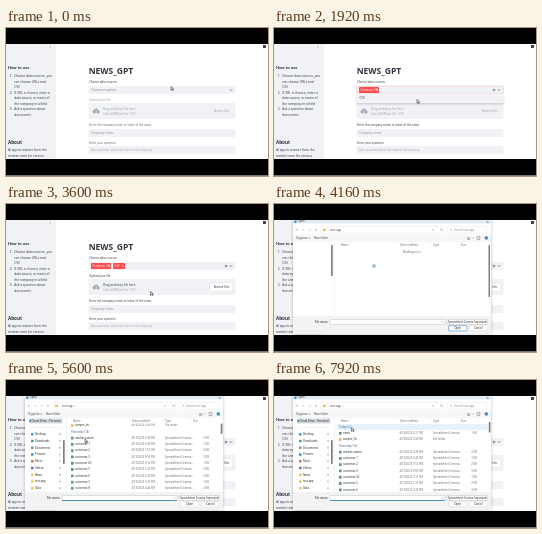
These frames come from a looping animation (262x148 px, 8 s). An HTML page with a canvas:

```html
<!DOCTYPE html>
<html lang="en">
<head>
<meta charset="utf-8">
<title>News assistant demo</title>
<style>
html, body { margin: 0; width: 100%; height: 100%; overflow: hidden; background: #000; }
canvas { display: block; width: 262px; height: 148px; }
</style>
</head>
<body>
<canvas id="stage" width="262" height="148"></canvas>
<script>
const ctx = document.getElementById('stage').getContext('2d');
const LOOP = 8000, STEP = 80;
const INK = '#31333f', PALE = '#f0f2f6', RED = '#ff4b4b', MUTED = '#9a9ca5';
const DARK = '#222', SOFT = '#666';

function rect(x, y, w, h, fill, stroke, radius = 0, line = .5) {
  ctx.beginPath();
  ctx.roundRect(x, y, w, h, radius);
  if (fill) { ctx.fillStyle = fill; ctx.fill(); }
  if (stroke) { ctx.strokeStyle = stroke; ctx.lineWidth = line; ctx.stroke(); }
}

function text(str, x, y, size = 3.2, color = INK, weight = 400, align = 'left') {
  ctx.font = `${weight} ${size}px "Open Sans", "Noto Sans", sans-serif`;
  ctx.textAlign = align;
  ctx.textBaseline = 'middle';
  ctx.fillStyle = color;
  ctx.fillText(str, x, y);
}

function path(points, color, width = .6) {
  ctx.beginPath();
  points.forEach(([x, y]) => ctx.lineTo(x, y));
  ctx.strokeStyle = color;
  ctx.lineWidth = width;
  ctx.stroke();
}

function chevron(x, y, color = INK, s = 1.1) {
  path([[x - s, y - s / 2], [x, y + s / 2], [x + s, y - s / 2]], color);
}

function cross(x, y, s, color) {
  path([[x - s, y - s], [x + s, y + s]], color, .5);
  path([[x + s, y - s], [x - s, y + s]], color, .5);
}

function disc(x, y, r, color) {
  ctx.beginPath();
  ctx.arc(x, y, r, 0, 7);
  ctx.fillStyle = color;
  ctx.fill();
}

function clipped(x, y, w, h, draw) {
  ctx.save();
  ctx.beginPath();
  ctx.rect(x, y, w, h);
  ctx.clip();
  draw();
  ctx.restore();
}

// Piecewise eased values: each key is [time, ...values].
function along(keys, t) {
  let i = 0;
  while (i < keys.length - 2 && t >= keys[i + 1][0]) i++;
  const a = keys[i], b = keys[i + 1];
  const p = Math.min(1, Math.max(0, (t - a[0]) / (b[0] - a[0])));
  const e = p * p * (3 - 2 * p);
  return a.slice(1).map((v, k) => v + (b[k + 1] - v) * e);
}

const pointerKeys = [
  [0, 165, 58.5], [720, 165, 58.5], [960, 152, 63], [1200, 139, 74],
  [1680, 139, 74], [1840, 143, 71.5], [2720, 143, 71.5], [3120, 144.5, 87.5],
  [3600, 144.5, 87.5], [3760, 214, 84], [3840, 214, 84], [4160, 99.5, 61],
  [4480, 99.5, 61], [5280, 79, 59], [6720, 79, 59], [7440, 77.5, 47.5], [8000, 77.5, 47.5]
];
const scrollKeys = [[0, 0], [5440, 0], [5600, 14], [5840, 38], [6080, 38], [6400, 0], [8000, 0]];

const steps = [
  ['1.', 'Choose data sources, you'], ['', 'can choose URLs and'], ['', 'CSV'],
  ['2.', 'If URL is chosen, enter a'], ['', 'data source, or name of'], ['', 'the company in a field'],
  ['3.', 'Ask a question about'], ['', 'documents']
];

function sidebar() {
  rect(0, 16, 50, 115, PALE);
  cross(44, 19, .7, '#a4a7b0');
  text('How to use', 2, 40, 3.9, INK, 700);
  steps.forEach(([mark, line], i) => {
    text(mark, 3.7, 48.3 + i * 5.55, 3.2);
    text(line, 8.2, 48.3 + i * 5.55, 3.2);
  });
  text('About', 2, 114.3, 4.6, INK, 700);
  text('AI app to answer from the', 2, 122.4, 3.2);
  text('market news for various', 2, 128, 3.2);
}

function tag(x, w, label) {
  rect(x, 59, w, 6, RED, null, .8);
  text(label, x + 1.5, 62, 2.8, '#fff');
  cross(x + w - 2, 62, .55, '#fff');
}

function uploader(ready) {
  const ink = ready ? INK : MUTED;
  text('Upload your file', 83, 72, 2.9, ink);
  rect(82.5, 75, 147, 16, PALE, null, 1);
  disc(88.3, 83.7, 1.8, '#a5abb6');
  disc(90.2, 82.6, 2.2, '#a5abb6');
  disc(92, 84, 1.7, '#a5abb6');
  path([[90.2, 85.2], [90.2, 82.3]], '#fff');
  text('Drag and drop file here', 97, 81.1, 3, ink);
  text('Limit 200MB per file • CSV', 97, 85.8, 2.7, MUTED);
  rect(204, 79, 23, 8.5, ready ? '#fff' : null, ready ? '#dcdee3' : null, 1);
  text('Browse files', 215.5, 83.2, 2.8, ink, 400, 'center');
}

function page(t) {
  rect(0, 16, 262, 115, '#fff');
  sidebar();
  rect(257, 17, 3, 3, '#444');
  text('NEWS_GPT', 82.7, 43.5, 8.5, INK, 700);
  text('Choose data sources', 83, 54, 2.9);

  const chosen = t < 1760 ? 0 : t < 2800 ? 1 : 2;
  const open = t >= 880 && t < 3040;
  rect(82.5, 58, 147, 8, PALE, open ? '#ff9c9c' : null, 1, .4);
  if (!chosen) text('Choose an option', 85, 62, 3, '#7b7e88');
  if (chosen > 0) tag(85, 20, 'Company URL');
  if (chosen > 1) tag(107, 12, 'CSV');
  if (chosen) {
    disc(220, 62, 1.3, '#777b85');
    cross(220, 62, .5, '#fff');
  }
  chevron(225, 62);

  uploader(chosen === 2);
  const lower = chosen ? INK : '#60636e';
  text('Enter the company name or ticker of the news', 83, 97.3, 2.9, lower);
  rect(82.5, 101, 147, 8, PALE, null, 1);
  text('Company name', 85, 105, 3, '#898c96');
  text('Enter your question', 83, 114.8, 2.9, lower);
  rect(82.5, 118, 147, 8, PALE, null, 1);
  text('Ask a question about the news of the company', 85, 122, 2.8, '#a0a3ac');

  if (open) {
    const options = chosen === 0 ? ['Company URL', 'CSV'] : chosen === 1 ? ['CSV'] : [];
    const height = 1 + 8 * Math.max(1, options.length);
    ctx.save();
    ctx.shadowColor = '#0004';
    ctx.shadowBlur = 2;
    ctx.shadowOffsetY = .8;
    rect(82.5, 66.2, 147, height, '#fff', null, 1);
    ctx.restore();
    if (chosen < 2) rect(83, 67, 146, 7.5, PALE);
    options.forEach((name, i) => text(name, 85.5, 70.4 + i * 8, 3));
  }
  if ((t >= 1760 && t < 1920) || (t >= 2800 && t < 3120)) {
    text('RUNNING…', 251, 19, 2.4, MUTED, 400, 'right');
  }
}

const places = ['Desktop', 'Downloads', 'Documents', 'Pictures', 'Music', 'Videos', 'News', 'test-app', 'Data'];
const placeColors = ['#2f9fd0', '#4a9b83', '#7691aa', '#3d87c8', '#e0654f', '#8a5bc0', '#f2c14e', '#f2c14e', '#f2c14e'];

function placesPane(t) {
  if (t >= 4560) {
    rect(23, 38.5, 33.5, 5, '#d5d9dd');
    text('Cloud Drive - Personal', 25.5, 41, 2.8, DARK);
    disc(24.2, 41, 1, '#2784cf');
    path([[24, 47.5], [56, 47.5]], '#e2e2e2', .4);
    places.forEach((name, i) => {
      const y = 54.3 + i * 6.75;
      rect(25, y - 1.2, 2.5, 2.4, placeColors[i], null, .4);
      text(name, 29, y, 2.8, DARK);
      rect(53.5, y - .7, 1, 1.4, '#888');
    });
    rect(57, 60, 1.7, 24, '#808080', null, .6);
  } else {
    rect(57, 41, 1.7, 31, '#808080', null, .6);
  }
  path([[60.3, 39], [60.3, 112]], '#e5e5e5', .5);
}

const listing = [
  { group: 'Today (2)' }, { name: 'news', size: '1 KB' }, { name: 'sample_fin', folder: true },
  { group: 'Yesterday (14)' }, { name: 'market-names', size: '2 KB' },
  ...Array.from({ length: 13 }, (_, i) => ({
    name: i === 3 ? 'customer (2)' : 'customer-' + (i + 1),
    size: 1 + i % 3 + ' KB'
  }))
];

function files(t) {
  const [scroll] = along(scrollKeys, t);
  const hover = t < 6240 ? -1 : t < 7200 ? 2 : 0;
  clipped(62, 43.5, 152.5, 68.5, () => {
    listing.forEach((file, i) => {
      const y = 47 + i * 6.28 - scroll;
      if (i === hover) rect(63, y - 2.9, file.group ? 151 : 140, 5.8, '#e5f2fb');
      if (file.group) {
        text(file.group, 65, y, 2.8, '#355f93');
        return;
      }
      rect(65, y - 1.4, 2.6, 2.8, file.folder ? '#f1b94b' : '#5f9a78', null, .4);
      text(file.name, 69, y, 2.8, DARK);
      text(`4/${i < 3 ? 14 : 13}/2023 ${1 + i % 9}:${10 + i * 7 % 50} PM`, 125.5, y, 2.7, SOFT);
      text(file.folder ? 'File folder' : 'Spreadsheet Comma…', 159, y, 2.7, SOFT);
      if (file.size) text(file.size, 203, y, 2.7, SOFT, 400, 'right');
    });
  });
  rect(214.8, 42 + scroll * .1, 1.6, 10.5, '#777', null, .6);
}

function dialogButton(x, w, label, active) {
  rect(x, 121.7, w, 5.2, '#fdfdfd', active ? '#2277bd' : '#d4d4d4', .7);
  text(label, x + w / 2, 124.2, 2.8, DARK, 400, 'center');
}

function dialog(t) {
  const loaded = t >= 4640;
  const grow = Math.min(1, Math.max(0, (t - 3840) / 160));
  ctx.save();
  ctx.globalAlpha = grow;
  const scale = .92 + .08 * grow;
  ctx.translate(118, 73);
  ctx.scale(scale, scale);
  ctx.translate(-118, -73);
  ctx.shadowColor = '#0004';
  ctx.shadowBlur = 3;
  rect(19, 16, 198, 114, '#fff');
  ctx.shadowColor = 'transparent';
  rect(19, 16, 198, 3.6, '#e1edf6');
  rect(20.2, 16.6, 2.2, 2.2, '#2882be');
  text('Open', 23.5, 17.7, 2.8, DARK);
  cross(213.5, 18, .9, '#555');

  path([[24, 26], [21.8, 26], [22.8, 25]], '#888', .5);
  path([[28, 26], [30.2, 26], [29.2, 25]], '#bbb', .5);
  chevron(36, 26, '#888', .8);
  path([[42, 27], [42, 24.8], [41, 25.8]], '#888', .5);
  rect(47, 22.5, 122, 6.8, '#fff', '#dedede', .5, .4);
  rect(49, 24.6, 2.8, 2.5, '#efbf54');
  text(loaded ? '›  test-app  ›' : '›  test-app', 54, 26, 2.8, '#444');
  chevron(159, 26, '#777', .8);
  text('↻', 166, 26, 3.5, '#777');
  rect(173, 22.5, 40, 6.8, '#fff', '#dedede', .5, .4);
  text('Search test-app', 180, 26, 2.8, '#888');
  disc(177, 25.7, .8, '#aaa');

  rect(19, 30.5, 198, 7.7, '#f6f7f8');
  text('Organize ▾', 22, 34.3, 2.8, '#444');
  text('New folder', 40, 34.3, 2.8, '#444');
  for (let i = 0; i < 3; i++) rect(193, 33 + i, 3.3, .5, '#888');
  chevron(199, 34, '#777', .7);
  rect(203, 32.6, 2.8, 3, '#edf4f8', '#66717a', 0, .5);
  disc(212.3, 34, 1.7, '#2280bd');
  text('?', 212.3, 34, 2.3, '#fff', 700, 'center');

  placesPane(t);
  ['Name', 'Date modified', 'Type', 'Size'].forEach((name, i) =>
    text(name, [67, 126, 159, 187][i], 41, 2.7, SOFT));
  for (const x of [124, 157, 185, 204]) path([[x, 39], [x, 43]], '#e6e6e6', .4);
  if (loaded) files(t);
  else {
    text('Working on it...', 138.5, 48.3, 2.8, SOFT, 400, 'center');
    rect(214.5, 41, 1.5, 52, '#808080', null, .6);
  }

  rect(19, 112, 198, 18, '#f3f3f3');
  text('File name:', 54, 118, 2.8, DARK, 400, 'right');
  rect(56, 115.5, 115, 5, '#fff', '#b5c4d0', .4);
  if (loaded) path([[56, 120.5], [171, 120.5]], '#2f7fb5', .8);
  chevron(168.5, 118, '#777', .7);
  rect(173, 115.5, 40, 5, '#fff', '#bdbdbd', .4);
  text('Spreadsheet Comma Separated', 174, 118, 2.6, DARK);
  chevron(211.5, 118, '#555', .7);
  dialogButton(174.5, 18.5, 'Open', !loaded);
  dialogButton(195.5, 17.5, 'Cancel', false);
  ctx.restore();
}

function pointer(t) {
  const [x, y] = along(pointerKeys, t);
  if (t >= 4000 && t < 4640) {
    ctx.beginPath();
    ctx.arc(x + .5, y + 1, 1.3, 0, 7);
    ctx.strokeStyle = '#39779d';
    ctx.lineWidth = .7;
    ctx.stroke();
    return;
  }
  ctx.save();
  ctx.translate(x, y);
  ctx.beginPath();
  [[0, 0], [0, 3.7], [.9, 2.9], [1.6, 4.2], [2.2, 3.9], [1.6, 2.6], [2.8, 2.6]]
    .forEach(([px, py]) => ctx.lineTo(px, py));
  ctx.closePath();
  ctx.fillStyle = '#fff';
  ctx.fill();
  ctx.strokeStyle = DARK;
  ctx.lineWidth = .55;
  ctx.stroke();
  ctx.restore();
}

function draw(now) {
  const t = Math.floor(now % LOOP / STEP) * STEP;
  rect(0, 0, 262, 148, '#000');
  rect(0, 147, 262, 1, '#777');
  clipped(0, 16, 262, 115, () => {
    page(t);
    if (t >= 3840) dialog(t);
    pointer(t);
  });
}

const start = performance.now();
function tick() {
  draw(performance.now() - start);
  requestAnimationFrame(tick);
}
tick();
</script>
</body>
</html>
```
